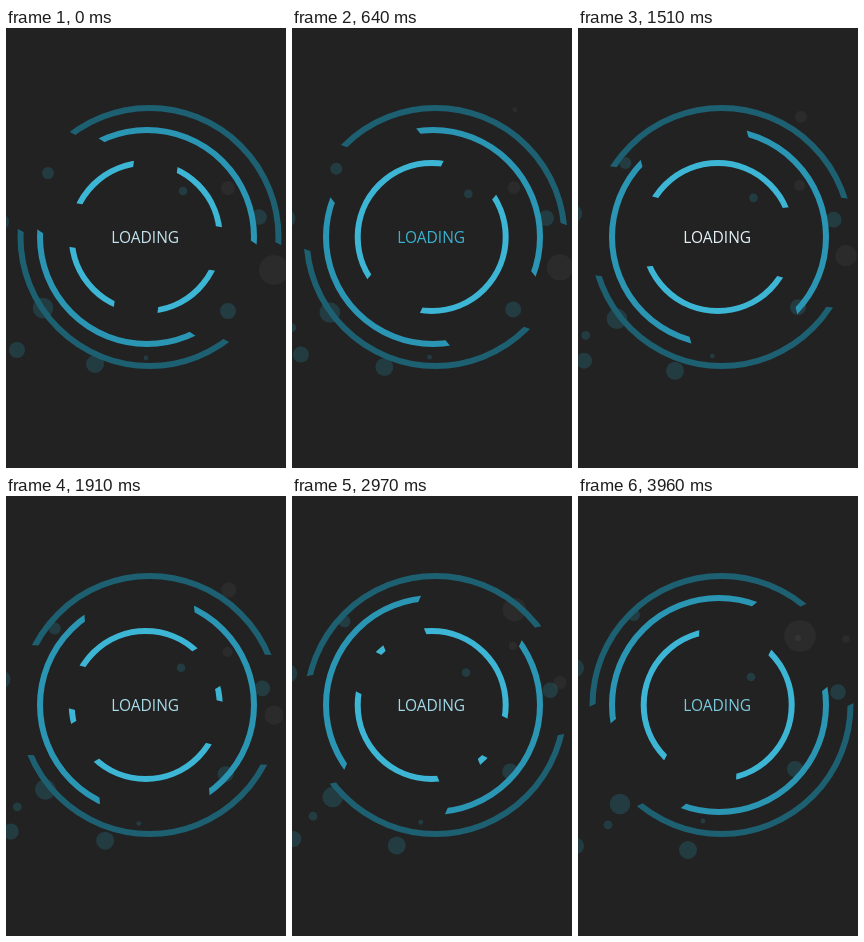
An HTML page for the animation above (4.06 s loop, 280 px wide and 440 px high).

```html
<!DOCTYPE html>
<html lang="en">
<head>
<meta charset="utf-8">
<title>Loading</title>
<style>
  html, body { margin: 0; width: 100%; height: 100%; overflow: hidden; background: #222; }
  svg { display: block; width: 280px; height: 440px; }

  /* All motion ends at 97.54% and holds its last pose for 100 ms. */
  .bar, .dots circle, text { animation: 4060ms linear infinite; }

  /* Each bar cuts two opposite gaps into its ring. */
  .bar { animation-name: spin; }
  @keyframes spin {
    0% { transform: rotate(var(--from)); }
    97.54%, 100% { transform: rotate(var(--to)); }
  }
  .ring { fill: none; stroke-width: 6; }

  .dots circle {
    fill: #2b9ab8;
    fill-opacity: .22;
    transform-box: fill-box;
    transform-origin: center;
    animation-name: drift;
  }
  .dots .grey {
    fill: #fff;
    fill-opacity: .045;
    animation-name: drift, resize;
    animation-timing-function: cubic-bezier(.33, 0, .67, .33), linear;
  }
  @keyframes drift { 97.54%, 100% { translate: var(--by); } }
  @keyframes resize {
    0% { scale: var(--grow, 1); }
    97.54%, 100% { scale: var(--shrink, 1); }
  }

  text {
    font: 500 15.5px "Open Sans", "Noto Sans", sans-serif;
    text-anchor: middle;
    animation-name: glow;
    animation-timing-function: ease-in-out;
  }
  @keyframes glow {
    0% { fill: #c3e3ec; }
    15.3%, 60.3% { fill: #3bb1d0; }
    37.8%, 82.9% { fill: #e3f2f6; }
    97.54%, 100% { fill: #7cc8dc; }
  }
</style>
</head>
<body>
<svg viewBox="0 0 280 440">
  <defs>
    <rect id="full" x="-140" y="-140" width="280" height="280" fill="#fff"/>
    <mask id="cutOuter" maskUnits="userSpaceOnUse" x="-140" y="-140" width="280" height="280">
      <use href="#full"/>
      <rect class="bar" x="-150" y="-55" width="300" height="110" style="--from:28.2deg;--to:-25.4deg"/>
    </mask>
    <mask id="cutMiddle" maskUnits="userSpaceOnUse" x="-140" y="-140" width="280" height="280">
      <use href="#full"/>
      <rect class="bar" x="-150" y="-55" width="300" height="110" style="--from:33.9deg;--to:140.4deg"/>
    </mask>
    <mask id="cutInner" maskUnits="userSpaceOnUse" x="-140" y="-140" width="280" height="280">
      <use href="#full"/>
      <rect class="bar" x="-150" y="-22" width="300" height="44" style="--from:9.4deg;--to:-447.2deg"/>
      <rect class="bar" x="-150" y="-22" width="300" height="44" style="--from:97.8deg;--to:297.5deg"/>
    </mask>
  </defs>

  <g class="dots">
    <circle cx="42" cy="145" r="6" style="--by:14px -26px"/>
    <circle cx="177" cy="163" r="4.3" style="--by:-4px 18px"/>
    <circle cx="253" cy="189" r="7.8" style="--by:7px 7px"/>
    <circle cx="222" cy="283" r="8" style="--by:-5px -10px"/>
    <circle cx="37" cy="280" r="10.3" style="--by:5px 28px"/>
    <circle cx="89" cy="336" r="9" style="--by:21px 18px"/>
    <circle cx="11" cy="322" r="8" style="--by:-13px 28px"/>
    <circle cx="140" cy="330" r="2.4" style="--by:-15px -5px"/>
    <circle cx="-6" cy="294" r="4.4" style="--by:36px 35px"/>
    <circle cx="-6" cy="194" r="9" style="--by:3px -22px"/>
    <circle class="grey" cx="222" cy="160" r="7" style="--by:-2px -18px;--shrink:.45"/>
    <circle class="grey" cx="268" cy="242" r="15" style="--by:0 -99px;--shrink:.25"/>
    <circle class="grey" cx="223" cy="80" r="15.8" style="--by:-1px 60px;--grow:0"/>
  </g>

  <g transform="translate(143.5 209)">
    <circle class="ring" r="129" stroke="#1d6072" mask="url(#cutOuter)"/>
  </g>
  <g transform="translate(141 209)">
    <circle class="ring" r="107" stroke="#2a96b4" mask="url(#cutMiddle)"/>
  </g>
  <g transform="translate(139.7 209)">
    <circle class="ring" r="74" stroke="#3db5d4" mask="url(#cutInner)"/>
  </g>

  <text x="139.2" y="215">LOADING</text>
</svg>
</body>
</html>
```
